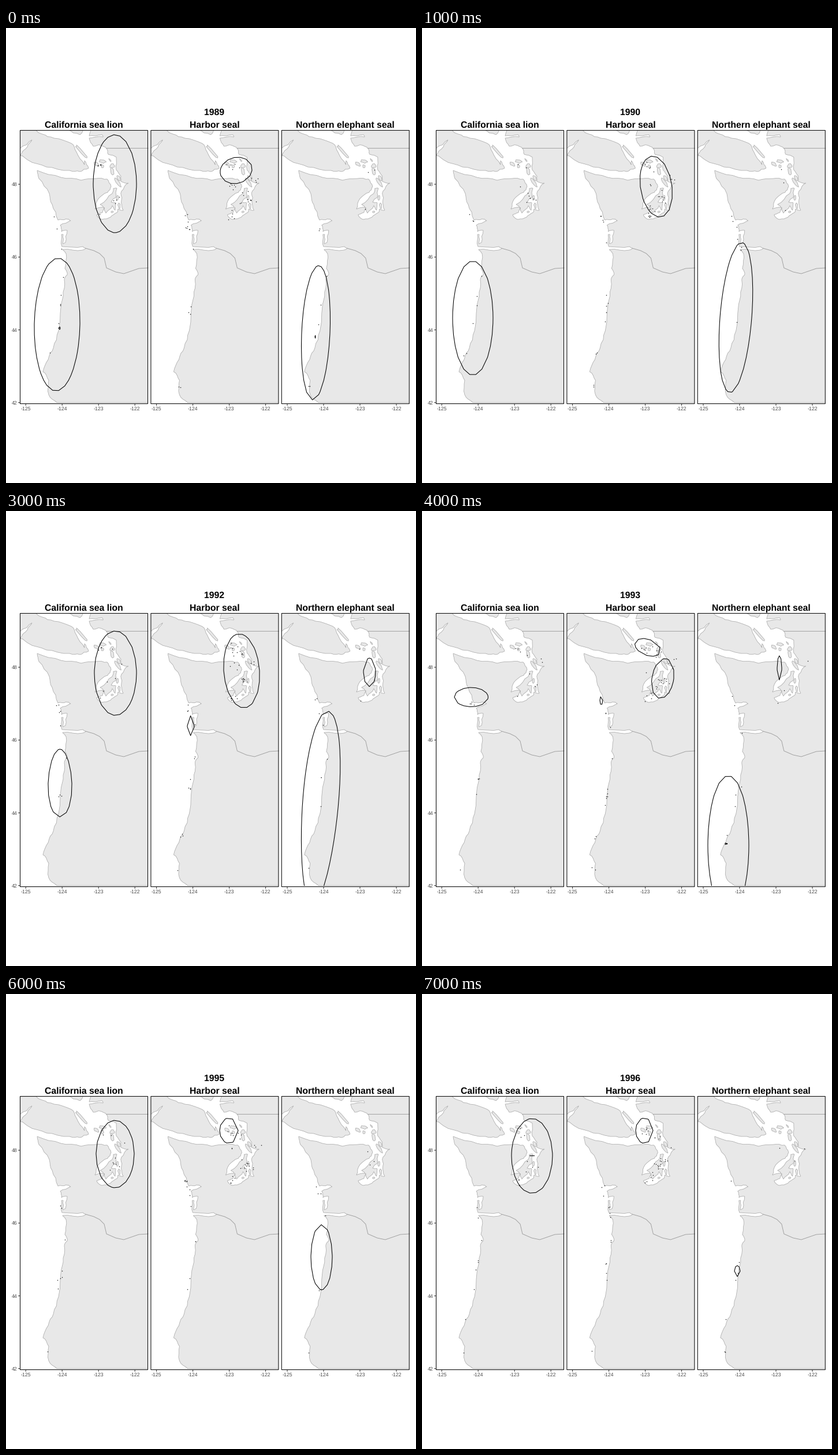
Write a matplotlib script that moves like this. It is 710 px wide and 789 px high and loops after 8000 ms.

```python
import numpy as np
import matplotlib.pyplot as plt
from matplotlib.animation import FuncAnimation
from matplotlib.collections import LineCollection
from matplotlib.patches import Polygon, Rectangle

W, H, DPI = 710, 789, 100
PX = 72 / DPI
STEP = 226.4
LEFT, TOP, WIDTH, HEIGHT = 24.5, 177.5, 221, 474
SOUTH_EDGE = 649.5
LAND, COAST = "#e8e8e8", "#adadad"
FIRST, YEARS = 1989, 8

plt.rcParams.update({"font.family": "Liberation Sans", "path.snap": False,
                     "text.hinting": "none"})
fig = plt.figure(figsize=(W / DPI, H / DPI), dpi=DPI, facecolor="white")
ax = fig.add_axes([0, 0, 1, 1])
ax.set(xlim=(0, W), ylim=(H, 0))
ax.axis("off")
rng = np.random.default_rng(7)

# Key points of the coast in stage pixels of the left panel
strait = [(107, 160), (107, 177), (128, 185), (136, 170), (147, 170),
          (144, 187), (166, 185), (168, 189), (144, 191), (151, 205),
          (163, 203), (174, 209), (177, 219), (191, 224), (191, 246),
          (199, 257), (199, 266), (212, 269), (200, 283)]
sound = [(200, 298), (203, 316), (194, 314), (192, 320), (181, 328),
         (166, 332), (157, 324), (167, 320), (170, 311), (173, 321),
         (184, 308), (189, 316), (190, 303), (182, 302), (190, 294),
         (192, 278), (186, 278), (184, 287), (163, 306), (169, 311),
         (154, 314), (160, 296), (176, 285), (182, 275), (175, 262),
         (156, 261), (130, 264), (95, 259)]
shore_north = [(54, 247), (57, 261), (75, 287), (80, 306), (90, 333)]
bays = [(104, 331), (112, 334), (94, 342), (96, 353), (106, 351), (103, 372),
        (98, 374), (99, 358), (96, 358), (97, 379), (133, 379), (138, 382),
        (133, 385), (98, 384)]
shore_south = [(104, 391), (102, 417), (106, 428), (101, 437), (99, 465),
               (91, 525), (82, 555), (73, 575), (64, 596), (74, 611),
               (74, 636), (88, SOUTH_EDGE)]
vancouver = [(10, 160), (51, 177), (63, 184), (83, 191), (113, 200),
             (122, 215), (136, 237), (136, 230), (143, 243), (128, 249),
             (110, 247), (70, 241), (38, 229), (25, 221), (37, 206),
             (45, 194), (24, 209), (10, 215)]
river = [(138, 382), (152, 386), (162, 391), (170, 399), (174, 416),
         (190, 423), (204, 426), (230, 417), (246, 416)]
border = [(174, 208.5), (246, 208.5)]
# Small islands: centre, length, width, bearing in degrees
islets = [(184, 249, 15, 6, 70), (194, 268, 18, 5, 55), (195, 260, 11, 5, 60),
          (184, 239, 9, 7, 0), (180, 229, 6, 2, 50), (167, 231, 13, 6, 10),
          (157, 236, 10, 6, 40), (167, 240, 6, 5, 90), (193, 295, 9, 4, 90),
          (196, 308, 10, 4, 80), (184, 319, 4, 3, 0), (130, 214, 30, 5, 48)]


def rough(pts, depth=2, amp=0.14):
    """Make a line ragged by moving the midpoints sideways."""
    pts = np.array(pts, float)
    for _ in range(depth):
        step = np.diff(pts, axis=0)
        normal = step[:, ::-1] * [-1, 1]
        shift = rng.uniform(-amp, amp, (len(step), 1))
        mid = pts[:-1] + step / 2 + np.clip(normal * shift, -1, 1)
        pts = np.insert(pts, np.arange(1, len(pts)), mid, axis=0)
    return pts


def islet(x, y, length, width, bearing):
    t = np.linspace(0, 2 * np.pi, 11)[:-1]
    r = rng.uniform(0.35, 0.58, t.size)
    a = np.radians(bearing)
    u, v = length * r * np.cos(t), width * r * np.sin(t)
    return np.column_stack([x + u * np.cos(a) - v * np.sin(a),
                            y + u * np.sin(a) + v * np.cos(a)])


coast = rough(strait + sound + shore_north + bays + shore_south)
mainland = np.vstack([coast, [(260, SOUTH_EDGE), (260, 160)]])
shapes = [mainland, rough(vancouver)] + [islet(*i) for i in islets]


def label(x, y, text, size, **kw):
    return ax.text(x, y, text, fontsize=size * PX, va="baseline", **kw)


def draw_panel(i, title):
    shift = np.array([i * STEP, 0])
    frame = Rectangle((LEFT + shift[0], TOP), WIDTH, HEIGHT, fill=False,
                      ec="#111111", lw=1.1 * PX, zorder=5)
    ax.add_patch(frame)
    for shape in shapes:
        patch = Polygon(shape + shift, fc=LAND, ec=COAST, lw=0.8 * PX)
        ax.add_patch(patch)
        patch.set_clip_path(frame)
    for line in (river, border):
        ax.plot(*(np.array(line) + shift).T, color="#9c9c9c", lw=0.9 * PX,
                clip_path=frame)
    label(135 + shift[0], 172.4, title, 15.7, ha="center", weight="bold")
    for k in range(4):
        x = 34.2 + 63 * k + shift[0]
        ax.plot([x, x], [651.5, 654.5], color="#333333", lw=PX)
        label(x, 663, str(k - 125), 8.8, ha="center", color="#4d4d4d")


for i, name in enumerate(["California sea lion", "Harbor seal",
                          "Northern elephant seal"]):
    draw_panel(i, name)
for k in range(4):
    y = 271 + 126.2 * k
    ax.plot([21.5, 24.5], [y, y], color="#333333", lw=PX)
    label(20, y + 3.2, str(48 - 2 * k), 8.8, ha="right", color="#4d4d4d")


def oval(left, top, right, bottom, lean=0, egg=0):
    """Density contour with corners where it crosses the sampling grid."""
    cx, cy = (left + right) / 2, (top + bottom) / 2
    rx, ry = (right - left) / 2, (bottom - top) / 2
    panel = (cx - LEFT) // STEP
    cols = (93.2 + STEP * panel + 10.4 * np.arange(-7, 15) - cx) / rx
    rows = (TOP + 19.7 * np.arange(30) - cy) / ry
    a = np.arccos(cols[abs(cols) < 1])
    b = np.arcsin(rows[abs(rows) < 1])
    t = np.sort(np.concatenate([a, -a, b, np.pi - b, [0, np.pi]])
                % (2 * np.pi))
    t = np.append(t, t[0])
    s = np.sin(t)
    x = cx + rx * np.cos(t) * (1 + egg * s) - lean * s
    return np.column_stack([x, cy + ry * s])


rings = {}


def contours_of(year, *boxes):
    rings[year] = [oval(*box) for box in boxes]


contours_of(1989, (49, 399, 128, 629.5, 2), (151, 185, 226, 355),
            (91, 518, 94, 523), (371, 224, 426, 270, 3),
            (512, 412, 561, 645, 5), (535, 533, 536, 538))
contours_of(1990, (53, 404, 123, 602), (378, 222, 433, 328, -6),
            (516, 372, 571, 632, 10))
contours_of(1991, (69, 407, 120, 546.5), (93, 470, 94, 474),
            (378, 230, 437, 358), (407, 293, 414, 299),
            (301, 433, 337, 532.5), (505, 335, 569, 735, 31),
            (546, 469, 546.5, 476))
contours_of(1992, (153, 208, 226, 354.5), (73, 413, 114, 530.5, 0, 0.1),
            (377, 213, 439, 341.5, -4), (314, 355, 326, 389.5),
            (619, 255, 640, 304.5), (513, 347, 575, 683, 13, -0.1),
            (546, 460, 546.5, 465))
contours_of(1993, (56, 306, 114.5, 339.5), (370, 221, 412, 252, -8),
            (398, 256, 436, 325, 4), (308, 321, 313, 336),
            (615, 251, 623, 293), (495, 459, 566, 701),
            (525, 574, 529, 580))
contours_of(1994, (157, 223, 218, 326, -3, 0.08), (91, 358, 95, 372),
            (369, 215, 403, 259), (405, 272, 432, 314),
            (582, 170, 650, 322), (520, 333, 582, 534, 5),
            (546, 431, 550, 435))
contours_of(1995, (156, 219, 222, 336), (370, 215, 402, 259),
            (528, 400, 565, 513))
contours_of(1996, (155, 216, 226, 345.5), (187, 279, 195, 282),
            (370, 215, 400, 259), (541, 471, 551, 490))

# Places where animals are usually counted
inlets = np.array([(162, 237), (165, 240), (179, 246), (206, 261), (167, 271),
                   (186, 290), (190, 293), (197, 299), (183, 300), (166, 325),
                   (171, 316)])
beaches = [325, 335, 348, 370, 384, 428, 464, 480, 494, 511, 565, 620]
shore_x, shore_y = np.array(shore_north + shore_south).T
COUNTS = [(10, 9), (32, 14), (3, 7)]  # inlet and beach dots per species


def sightings(year):
    gen = np.random.default_rng(year)
    found = []
    for i, (inner, outer) in enumerate(COUNTS):
        a = gen.choice(inlets, inner) + gen.normal(0, 4, (inner, 2))
        y = gen.choice(beaches, outer) + gen.normal(0, 2, outer)
        x = np.interp(y, shore_y, shore_x) + gen.normal(-3, 2, outer)
        found.append(np.vstack([a, np.column_stack([x, y])]) + [i * STEP, 0])
    return np.vstack(found)


heading = label(361, 150.4, "", 15.7, ha="center", weight="bold")
contours = LineCollection([], colors="black", linewidths=1.05 * PX, zorder=4)
ax.add_collection(contours, autolim=False)
contours.set_clip_path(Rectangle((0, TOP), W, SOUTH_EDGE - TOP,
                                 transform=ax.transData))
points, = ax.plot([], [], "o", ms=1.5 * PX, mew=0, color="#222222", zorder=3)


def update(i):
    year = FIRST + i
    heading.set_text(str(year))
    contours.set_segments(rings[year])
    points.set_data(*sightings(year).T)
    return heading, contours, points


anim = FuncAnimation(fig, update, frames=YEARS, interval=1000, repeat=True)
plt.show()
```
